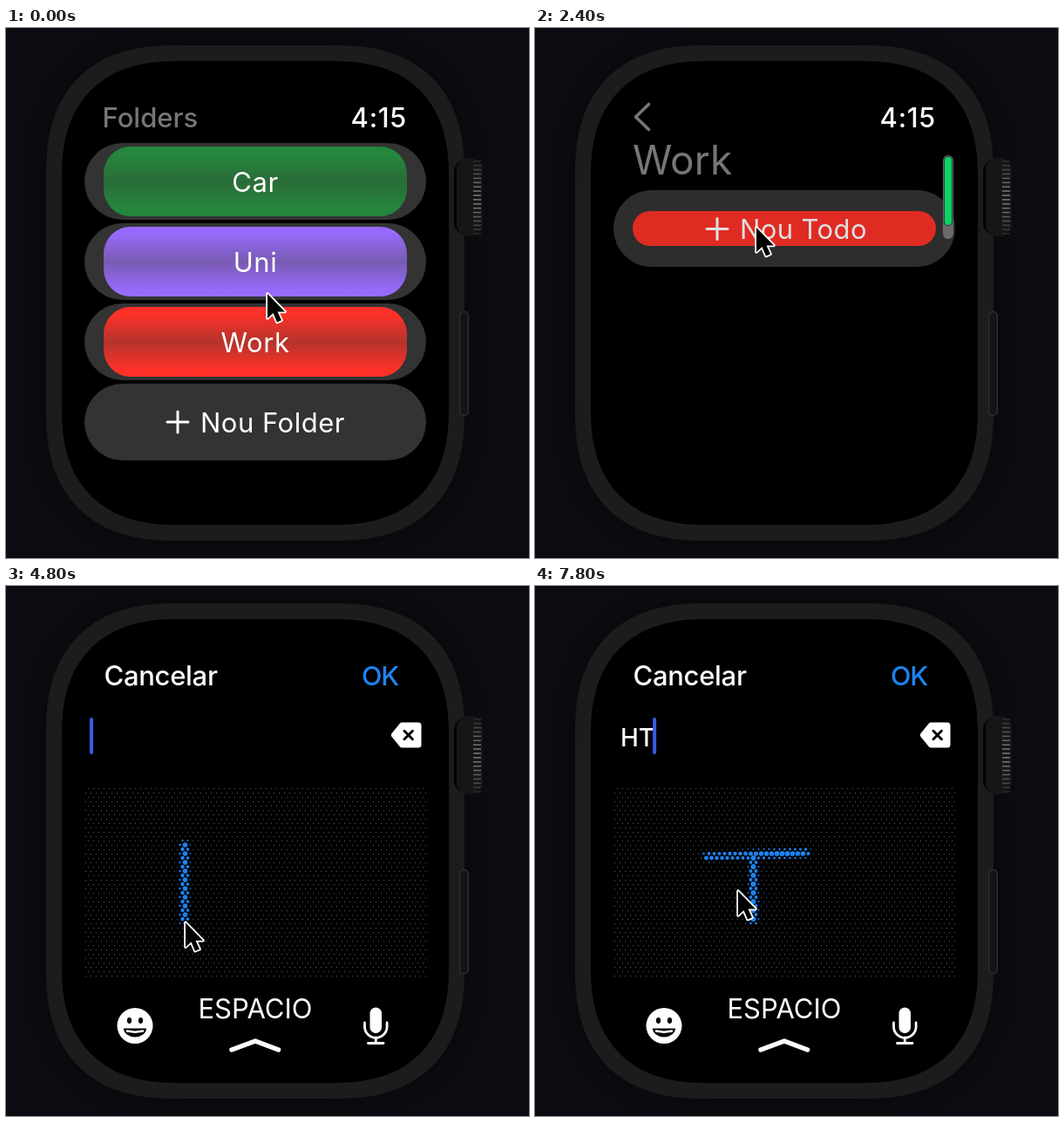
Write an HTML page with a canvas that moves like this. It is 600 by 608 pixels and loops after 8 s.

```html
<!DOCTYPE html>
<html lang="ca">
<head>
<meta charset="utf-8">
<title>Watch todo</title>
<style>
html, body { margin: 0; width: 100%; height: 100%; overflow: hidden; background: #0b0d12; }
canvas { display: block; }
</style>
</head>
<body>
<canvas id="stage" width="600" height="608"></canvas>
<script>
const ctx = document.getElementById('stage').getContext('2d');
const LOOP = 8000, STEP = 200;
const GRAY = '#767676', PILL = '#333333', RED = '#ff3128', BLUE = '#1e83f0';

const clamp = v => Math.max(0, Math.min(1, v));
const mix = (a, b, k) => a + (b - a) * k;
const mixPoint = (a, b, k) => [mix(a[0], b[0], k), mix(a[1], b[1], k)];
const easeOut = (k, power = 2) => 1 - (1 - clamp(k)) ** power;

// The pointer rests, then writes; it glides between the steps of this path.
const rest = (start, end, p) => ({ start, end, a: p, b: p });
const write = (letter, start, end, a, b) => ({ letter, start, end, a, b });
const PATH = [
  rest(0, 400, [299, 303]),
  rest(1000, 1600, [314, 365]),
  rest(2200, 3600, [253, 227]),
  write('H', 4200, 5000, [205, 297], [205, 390]),
  write('H', 5200, 5600, [205, 345], [250, 345]),
  write('H', 5800, 6400, [247.5, 307], [250.5, 381]),
  write('T', 6600, 7000, [250.5, 310], [250.5, 383]),
  write('T', 7180, 7400, [197, 310.5], [311, 306]),
  rest(7800, LOOP, [232, 348])
];

const along = (m, t) => mixPoint(m.a, m.b, easeOut((t - m.start) / (m.end - m.start)));

function pointerAt(t) {
  const i = PATH.findLastIndex(m => t >= m.start);
  const m = PATH[i], next = PATH[i + 1];
  if (t <= m.end) return along(m, t);
  return mixPoint(m.b, next.a, (t - m.end) / (next.start - m.end));
}

function inkAt(t) {
  const letter = t < 6600 ? 'H' : 'T';
  return PATH.filter(m => m.letter === letter && t > m.start).map(m => [m.a, along(m, t)]);
}

function box(x, y, w, h, r, fill) {
  ctx.beginPath();
  ctx.roundRect(x, y, w, h, r);
  ctx.fillStyle = fill;
  ctx.fill();
}

function line(points, width, color) {
  ctx.beginPath();
  points.forEach(p => ctx.lineTo(...p));
  ctx.lineWidth = width;
  ctx.strokeStyle = color;
  ctx.lineCap = ctx.lineJoin = 'round';
  ctx.stroke();
}

function disc(x, y, rx, ry, fill) {
  ctx.beginPath();
  ctx.ellipse(x, y, rx, ry, 0, 0, 2 * Math.PI);
  ctx.fillStyle = fill;
  ctx.fill();
}

function label(str, x, y, { size = 31, weight = 400, color = '#fff', align = 'left', gap = 0, wordGap = 0 } = {}) {
  ctx.font = `${weight} ${size}px Inter, Roboto, sans-serif`;
  ctx.letterSpacing = gap + 'px';
  ctx.wordSpacing = wordGap + 'px';
  ctx.textAlign = align;
  ctx.fillStyle = color;
  ctx.fillText(str, x, y);
}

// Rectangle with superelliptic corners
function squircle(x, y, w, h, r) {
  const reach = (v, half) => Math.sign(v) * (half - r + r * Math.abs(v) ** 0.82);
  ctx.beginPath();
  for (let i = 0; i < 240; i++) {
    const a = (i + 0.5) / 240 * 2 * Math.PI;
    ctx.lineTo(x + w / 2 + reach(Math.cos(a), w / 2), y + h / 2 + reach(Math.sin(a), h / 2));
  }
  ctx.closePath();
}

function watch() {
  ctx.fillStyle = '#0b0d12';
  ctx.fillRect(0, 0, 600, 608);
  ctx.save();
  ctx.shadowColor = 'rgba(0,0,0,.55)';
  ctx.shadowBlur = 40;
  ctx.fillStyle = '#1c1c1c';
  squircle(46, 20, 480, 568, 150);
  ctx.fill();
  ctx.restore();

  box(514, 150, 30, 88, 16, '#030303');
  box(517, 149, 30, 90, 14, '#161616');
  for (let i = 0; i < 18; i++) {
    const v = 35 + 80 * Math.sin(Math.PI * (i + 0.5) / 18);
    ctx.fillStyle = `rgb(${v},${v},${v})`;
    ctx.fillRect(536, 152 + i * 4.9, 9, 1.6);
  }
  box(520, 325, 11, 120, 5, '#303030');
  box(521.3, 326.3, 8.4, 117.4, 4, '#141414');

  ctx.fillStyle = '#000';
  squircle(64, 38, 444, 532, 135);
  ctx.fill();
}

function clock() {
  label('4:15', 460, 114, { weight: 500, align: 'right', gap: 0.8 });
}

function plus(x, y) {
  line([[x - 12, y], [x + 12, y]], 3, '#fff');
  line([[x, y - 12], [x, y + 12]], 3, '#fff');
}

function pill(y, fill = PILL) {
  box(90, y, 392, 88, 44, fill);
}

function folder(name, y, edge, mid) {
  pill(y);
  const g = ctx.createLinearGradient(0, y + 4, 0, y + 84);
  g.addColorStop(0.1, edge);
  g.addColorStop(0.5, mid);
  g.addColorStop(0.9, edge);
  box(112, y + 4, 348, 80, 31, g);
  label(name, 286, y + 56, { align: 'center', gap: 0.6 });
}

function foldersPage(t) {
  label('Folders', 110.5, 114, { weight: 500, color: GRAY });
  clock();
  folder('Car', 132, '#24873d', '#2a6c39');
  folder('Uni', 224, '#966bfb', '#785ab2');
  folder('Work', 316, RED, '#b3342c');
  if (t >= 1200) pill(316, 'rgba(0,0,0,.07)');
  pill(408);
  plus(197, 452);
  label('Nou Folder', 223, 464, { gap: 0.5 });
}

function pageHead(title) {
  line([[130.5, 87.5], [115.5, 102], [130.5, 116.5]], 3.6, GRAY);
  label(title, 112, 168, { size: 46, color: GRAY, gap: 0.1, wordGap: -5 });
}

function scroller(shade) {
  box(468, 146, 12, 96, 6, '#6a6a6a');
  box(469, 147, 10, 80, 5, '#26382e');
  box(470, 148, 8, 78, 4, '#0ed264');
  box(468, 146, 12, 96, 6, `rgba(0,0,0,${shade})`);
}

function workPage(t) {
  pageHead('Work');
  clock();
  pill(186);
  box(112, 210, 348, 40, 20, RED);
  plus(209, 230.5);
  label('Nou Todo', 235, 242, { gap: 0.4 });
  if (t >= 2400) pill(186, 'rgba(0,0,0,.12)');
  scroller(0);
}

function formPage(t) {
  const dimmed = t >= 3200;
  pageHead('Afegeix Todo');
  if (!dimmed) clock();
  ctx.save();
  ctx.globalAlpha = dimmed ? 0.49 : 1;
  box(91, 186, 390, 81, [0, 0, 20, 20], '#3d3d3d');
  box(106, 298, 360, 80, 20, RED);
  ctx.restore();
  label('Afegeix nou Todo...', 110.5, 232, { color: dimmed ? '#707070' : '#9a9a9a', gap: 0.5 });
  scroller(dimmed ? 0.5 : 0);
}

function distance(x, y, [ax, ay], [bx, by]) {
  const dx = bx - ax, dy = by - ay;
  const k = clamp(((x - ax) * dx + (y - ay) * dy) / (dx * dx + dy * dy || 1));
  return Math.hypot(x - ax - dx * k, y - ay - dy * k);
}

function dotPad(t) {
  const ink = inkAt(t);
  for (let row = 0; row < 44; row++) {
    const y = 232 + row * 5;
    for (let x = row % 2 ? 91.5 : 94.5; x < 483; x += 6) {
      const d = Math.min(...ink.map(([a, b]) => distance(x, y, a, b)));
      if (d < 7) {
        const r = 3 - 0.33 * d;
        disc(x, y, r, r, BLUE);
      } else {
        ctx.fillStyle = '#5c5c5c';
        ctx.fillRect(x - 0.5, y, 1, 1);
      }
    }
  }
}

function backspace() {
  line([[445.5, 171], [454.5, 160], [473, 160], [473, 182], [454.5, 182], [445.5, 171]], 7, '#fff');
  ctx.fillStyle = '#fff';
  ctx.fill();
  for (const s of [-4.7, 4.7]) line([[461.7 - s, 166.3], [461.7 + s, 175.7]], 3, '#000');
}

function smiley() {
  disc(148, 504.5, 20.5, 20.5, '#fff');
  for (const s of [-6.5, 6.5]) disc(148 + s, 498.5, 2.6, 3.4, '#000');
  ctx.beginPath();
  ctx.ellipse(148, 507.5, 13, 10, 0, 0, Math.PI);
  ctx.fillStyle = '#000';
  ctx.fill();
  line([[139, 510.5], [148, 511.8], [157, 510.5]], 2.6, '#fff');
}

function microphone() {
  box(417.5, 483.5, 13.5, 29.5, 6.75, '#fff');
  ctx.beginPath();
  ctx.moveTo(411.5, 501);
  ctx.arc(424.3, 505.5, 12.8, Math.PI, 0, true);
  ctx.lineTo(437.1, 501);
  ctx.lineWidth = 2.8;
  ctx.strokeStyle = '#fff';
  ctx.stroke();
  line([[424.3, 518], [424.3, 524]], 2.8, '#fff');
  line([[415.5, 524.5], [433, 524.5]], 2.8, '#fff');
}

function typed(t) {
  const str = t >= 7600 ? 'HT' : t >= 6800 ? 'H' : '';
  label(str, 98, 183.5, { size: 28, weight: 450 });
  const x = 96 + ctx.measureText(str).width;
  if (t >= 3600 && Math.floor(t / 500) % 2) box(x, 151, 4, 42, 2, '#3b5be6');
}

function sheet(t) {
  ctx.save();
  squircle(88, 62, 396, 492, 110);
  ctx.clip();
  ctx.translate(0, 484 * (1 - easeOut((t - 3000) / 600, 1.6)));
  ctx.fillStyle = '#000';
  ctx.fillRect(88, 62, 396, 492);
  dotPad(t);
  backspace();
  typed(t);
  ctx.globalAlpha = mix(0.5, 1, clamp((t - 3600) / 400));
  label('Cancelar', 112.5, 114, { weight: 500, gap: -0.3 });
  label('OK', 450, 114, { size: 30.5, weight: 500, color: BLUE, align: 'right', gap: -1.2 });
  label('ESPACIO', 286, 496, { align: 'center' });
  line([[259, 532], [286, 522], [312.5, 532]], 5.5, '#fff');
  smiley();
  microphone();
  ctx.restore();
}

function pointer([x, y]) {
  ctx.save();
  ctx.translate(x, y);
  line([[1, 2], [1, 30], [7.5, 24], [12, 34.5], [17, 32.3], [12.5, 22.5], [21, 22.5], [1, 2]], 3.6, '#fff');
  ctx.fillStyle = '#000';
  ctx.fill();
  ctx.restore();
}

function draw(now) {
  const t = Math.floor(now % LOOP / STEP) * STEP;
  watch();
  if (t < 1400) foldersPage(t);
  else if (t < 2600) workPage(t);
  else if (t < 3600) formPage(t);
  if (t > 3000) sheet(t);
  pointer(pointerAt(t));
}

const start = performance.now();
function tick() {
  draw(performance.now() - start);
  requestAnimationFrame(tick);
}
tick();
</script>
</body>
</html>
```
